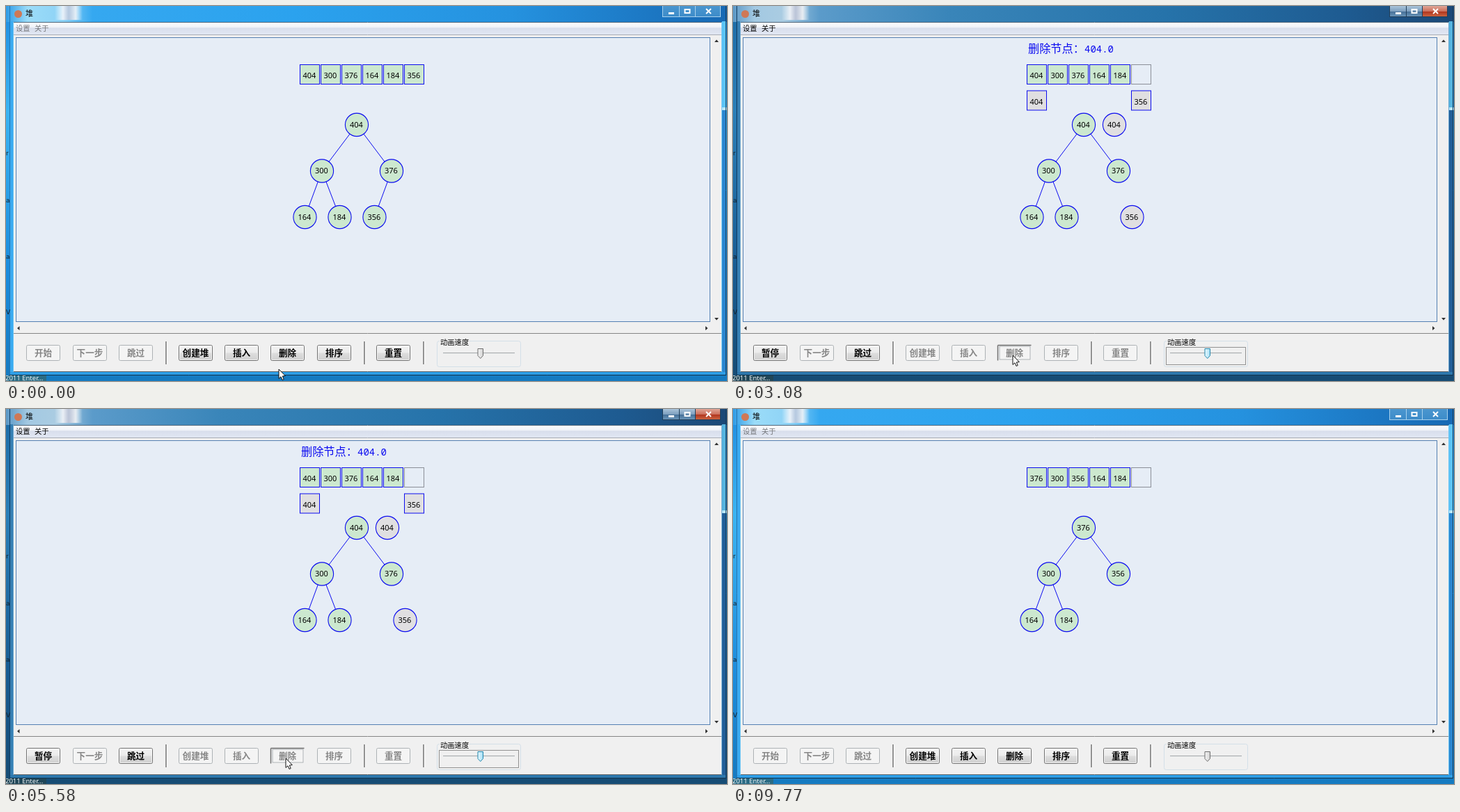
Recreate the animation shown at these times as an HTML page with a canvas. Size 1036x540 px, loop 9870 ms.

```html
<!DOCTYPE html>
<html lang="zh">
<head>
<meta charset="utf-8">
<title>堆</title>
<style>
html, body { margin: 0; width: 100%; height: 100%; overflow: hidden; }
canvas { display: block; }
</style>
</head>
<body>
<canvas id="stage" width="1036" height="540"></canvas>
<script>
const g = document.getElementById('stage').getContext('2d');
const LOOP = 9870, W = 1036, H = 540;
const CJK = '"Noto Sans CJK SC", "Noto Sans CJK", sans-serif';
const NUM = '11px "Noto Sans", sans-serif';
const NUM_BOLD = 'bold 10px "DejaVu Sans", sans-serif';
const BLUE = '#0c0cf0', GREEN = '#cce8cf', GREY = '#e0dfe1', RED = '#f00a0a';

const NODES = [[504, 171], [454, 237.5], [554, 237.5], [429.5, 304], [479.5, 304], [529.5, 304]];
const cellX = i => 422.5 + 30 * i;
const CELL_Y = 84.5, DROP = 37.5, SHIFT = 44;

// Screen updates come in runs of eight ticks.
const RUNS = [1140, 2240, 3350, 4400, 5580, 6660, 7740, 8790, 9840];
function tickAt(t) {
  if (t < RUNS[0]) return -1;
  let r = 0;
  while (r < 7 && t >= RUNS[r + 1]) r++;
  return r * 8 + Math.floor((t - RUNS[r]) / ((RUNS[r + 1] - RUNS[r]) / 8));
}

const clamp = v => Math.max(0, Math.min(1, v));
const mix = (a, b, p) => a + (b - a) * p;

function rect(x, y, w, h, fill) {
  g.fillStyle = fill;
  g.fillRect(x, y, w, h);
}
function box(x, y, w, h, fill, stroke, lw = 1) {
  if (fill) rect(x, y, w, h, fill);
  g.strokeStyle = stroke;
  g.lineWidth = lw;
  g.strokeRect(x, y, w, h);
}
function roundBox(x, y, w, h, r, fill, stroke) {
  g.beginPath();
  g.roundRect(x, y, w, h, r);
  if (fill) { g.fillStyle = fill; g.fill(); }
  g.strokeStyle = stroke;
  g.lineWidth = 1;
  g.stroke();
}
function line(x1, y1, x2, y2, color, lw = 1) {
  g.strokeStyle = color;
  g.lineWidth = lw;
  g.beginPath();
  g.moveTo(x1, y1);
  g.lineTo(x2, y2);
  g.stroke();
}
function poly(points, fill, stroke) {
  g.beginPath();
  points.forEach(([x, y]) => g.lineTo(x, y));
  g.closePath();
  g.fillStyle = fill;
  g.fill();
  if (stroke) { g.strokeStyle = stroke; g.lineWidth = 1; g.stroke(); }
}
function text(s, x, y, font, color, align = 'left') {
  g.font = font;
  g.fillStyle = color;
  g.textAlign = align;
  g.fillText(s, x, y);
}
function ramp(x1, y1, x2, y2, ...stops) {
  const grad = g.createLinearGradient(x1, y1, x2, y2);
  stops.forEach(([at, color]) => grad.addColorStop(at, color));
  return grad;
}

function drawDesktop(active) {
  rect(0, 0, W, H, active
    ? ramp(0, 0, 0, H, [0, '#1c6ba6'], [0.28, '#2a7fb8'], [0.7, '#175c93'], [1, '#164c74'])
    : ramp(0, 0, 0, H, [0, '#1f8ce0'], [0.28, '#3bb4f2'], [0.7, '#1c8ddd'], [1, '#157ac0']));
  rect(0, 0, W, 23, active
    ? ramp(0, 0, W, 0, [0, '#5a97c5'], [0.03, '#a3c9e2'], [0.07, '#aacce2'], [0.12, '#5b9bca'],
        [0.3, '#3985b9'], [0.6, '#2673aa'], [0.85, '#1e5b91'], [1, '#1b4876'])
    : ramp(0, 0, W, 0, [0, '#2e9be6'], [0.03, '#9bdcf8'], [0.08, '#8dd2f6'], [0.12, '#35a8f0'],
        [0.4, '#2ba2ee'], [0.7, '#2592df'], [1, '#1769b4']));
  rect(70, 0, 40, 20, ramp(70, 0, 110, 0, [0, 'rgba(255,255,255,0)'], [0.3, 'rgba(248,247,250,.85)'],
    [0.5, 'rgba(205,200,215,.7)'], [0.75, 'rgba(250,247,247,.85)'], [1, 'rgba(255,255,255,0)']));

  // window frame
  const edge = active ? '#6ba7d0' : '#6cc5f4';
  rect(6, 22, 4, 509, active ? '#367fb3' : '#3aaaf0');
  rect(1029, 22, 5, 128, active ? '#56b4df' : '#5cc4f6');
  rect(1029, 150, 5, 381, active ? '#225f98' : '#2b86cf');
  rect(1029, 146, 7, 4, '#b8e7fb');
  rect(6, 527, 1028, 4, active ? '#2d78ad' : '#2e9ee6');
  line(5.5, 0, 5.5, 531, active ? '#123c60' : '#2875ae');
  line(1034.5, 0, 1034.5, 531, '#143c5d');
  line(5, 531.5, 1035, 531.5, '#12354f');
  line(10.5, 23, 10.5, 527, edge);
  line(1028.5, 23, 1028.5, 527, edge);

  [['r', 215], ['a', 283], ['a', 364], ['V', 444]].forEach(([s, y]) =>
    text(s, 0, y, '9px "DejaVu Sans", sans-serif', '#10202c'));
  rect(0, 532, 58, 8, active ? '#204657' : '#2a6b84');
  text('2011 Enter...', -1, 539, '9.5px "Noto Sans", sans-serif', '#f2f6f8');
}

function drawTitle(active) {
  g.fillStyle = '#cf7856';
  g.beginPath();
  g.arc(17.5, 11.5, 5.5, 0, 7);
  g.fill();
  text('堆', 28, 15, '11px ' + CJK, '#000');

  const glass = active
    ? ramp(0, 0, 0, 16, [0, '#a9c3d9'], [0.48, '#7d9fbe'], [0.5, '#456f97'], [1, '#6f9abd'])
    : ramp(0, 0, 0, 16, [0, '#4a96cf'], [1, '#3c8bc8']);
  const red = active
    ? ramp(0, 0, 0, 16, [0, '#e0a596'], [0.48, '#cc6f5b'], [0.5, '#b0341d'], [1, '#cf6a45'])
    : glass;
  const rim = active ? '#203e59' : '#a6d0ec';
  box(943.5, -1.5, 24, 17, glass, rim);
  box(967.5, -1.5, 23, 17, glass, rim);
  box(990.5, -1.5, 36, 17, red, rim);
  rect(952, 9, 8, 3, '#fff');
  box(975.5, 5, 7, 5, null, '#fff', 2);
  line(1006, 4, 1013, 11, '#fff', 2);
  line(1013, 4, 1006, 11, '#fff', 2);
}

function drawClient(active) {
  rect(11, 23, 1017, 504, '#f0f0f0');
  rect(11, 24, 1017, 17, ramp(0, 24, 0, 41, [0, '#fff'], [0.42, '#edf0f7'], [0.45, '#d8deec'], [1, '#e1e7f3']));
  line(11, 23.5, 1028, 23.5, '#50667a');
  line(11, 41.5, 1028, 41.5, '#a9adb6');
  const ink = active ? '#000' : '#75777c';
  text('设置', 14, 36, '10.3px ' + CJK, ink);
  text('关于', 41, 36, '10.3px ' + CJK, ink);

  box(14.5, 45.5, 997, 409, '#e6edf6', '#5580b2');
  const tip = '#303030';
  poly([[1018, 52], [1024, 52], [1021, 48.5]], tip);
  poly([[1018, 449], [1024, 449], [1021, 452.5]], tip);
  poly([[19.5, 461], [19.5, 467], [16, 464]], tip);
  poly([[1005, 461], [1005, 467], [1008.5, 464]], tip);
  line(11, 471.5, 1028, 471.5, '#858585');
  line(11, 526.5, 1028, 526.5, '#666');
  [230, 515, 600].forEach(x => {
    line(x, 483, x, 516, '#7c7c7c', 1.6);
    line(x + 1.5, 483, x + 1.5, 516, '#fff');
  });
}

function button(label, x, inkOn, faceOn, mode) {
  const y = 488.5, w = 48, h = 22;
  if (mode === 'pressed') {
    rect(x, y, w, h, '#f4f4f4');
    box(x + 2.5, y + 1.5, w - 4, h - 3, null, '#adb2b5');
    line(x, y, x + w, y, '#707070', 1.5);
    line(x, y, x, y + h, '#707070', 1.5);
  } else {
    const face = mode === 'hover'
      ? ramp(0, y, 0, y + h, [0, '#eaf6fd'], [0.48, '#d9f0fc'], [0.52, '#bee6fd'], [1, '#a7d9f5'])
      : faceOn
        ? ramp(0, y, 0, y + h, [0, '#f3f3f3'], [0.48, '#ebebeb'], [0.52, '#dddddd'], [1, '#cfcfcf'])
        : '#f4f4f4';
    roundBox(x, y, w, h, 2, face, mode === 'hover' ? '#3c7fb1' : faceOn ? '#707070' : '#adb2b5');
    if (faceOn) roundBox(x + 1, y + 1, w - 2, h - 2, 1, null, 'rgba(255,255,255,.75)');
  }
  text(label, x + w / 2, 503.5, 'bold 12.6px ' + CJK, inkOn ? '#000' : '#868686', 'center');
}

function drawToolbar(t, n, active) {
  const busy = n >= 0 && n < 57;
  const faceBusy = n > 0 && n < 58;
  const mode = busy ? (t < 7740 ? 'pressed' : '') : t >= 300 && t < 1140 ? 'hover' : '';
  button(busy ? '暂停' : '开始', 29.5, busy, faceBusy);
  button('下一步', 96.5, false, false);
  button('跳过', 162.5, busy, faceBusy);
  button('创建堆', 248.5, !busy, !faceBusy);
  button('插入', 314.5, !busy, !faceBusy);
  button('删除', 380.5, !busy, !faceBusy, mode);
  button('排序', 447.5, !busy, !faceBusy);
  button('重置', 532.5, !busy, !faceBusy);

  roundBox(619.5, 482.5, 120, 37, 3, null, '#d3dfe8');
  rect(623, 480, 43, 9, '#f0f0f0');
  text('动画速度', 624, 487.5, '10.3px ' + CJK, '#000');
  line(628, 499.5, 731, 499.5, '#a9acae');
  line(628, 500.5, 731, 500.5, '#e4e7e8');
  if (active) {
    g.setLineDash([1, 1]);
    box(622.5, 491.5, 114, 25, null, '#333');
    g.setLineDash([]);
  }
  poly([[678, 493.5], [685.5, 493.5], [685.5, 503.5], [681.75, 507.5], [678, 503.5]],
    active ? ramp(678, 0, 686, 0, [0, '#eafaff'], [1, '#9fdcf4']) : ramp(678, 0, 686, 0, [0, '#f5f5f5'], [1, '#cfcfcf']),
    active ? '#2387ad' : '#6f6f6f');
}

function cell(x, y, value, fill) {
  box(x, y, 28, 28, fill, BLUE);
  text(value, x + 4, y + 19.5, NUM, '#000');
}
function node(x, y, value, fill) {
  g.beginPath();
  g.arc(x, y, 16.6, 0, 7);
  g.fillStyle = fill;
  g.fill();
  g.strokeStyle = BLUE;
  g.lineWidth = 1.1;
  g.stroke();
  text(value, x - 10, y + 3.7, NUM, '#000');
}
function mark(x, y, cx, cy) {
  box(x, y, 28.5, 28.5, null, RED, 2.6);
  g.beginPath();
  g.arc(cx, cy, 16.6, 0, 7);
  g.lineWidth = 2.8;
  g.stroke();
}
const markNode = i => mark(cellX(i), CELL_Y, ...NODES[i]);

// A red value travels in the array and in the tree at once.
function flyValue(value, p, fromCell, toCell, fromNode, toNode) {
  const at = (a, b, k) => mix(a[k], b[k], p);
  text(value, at(fromCell, toCell, 0) + 4, at(fromCell, toCell, 1) + 19.5, NUM_BOLD, RED);
  text(value, at(fromNode, toNode, 0) - 10, at(fromNode, toNode, 1) + 3.7, NUM_BOLD, RED);
}

function drawHeap(n) {
  const values = [n >= 45 ? 376 : 404, 300, n >= 56 ? 356 : 376, 164, 184, 356];
  const count = n >= 14 ? 5 : 6;
  for (let i = 1; i < count; i++) {
    line(...NODES[(i - 1) >> 1], ...NODES[i], BLUE);
  }
  if (count < 6) box(cellX(5), CELL_Y, 28, 28, null, '#8b8f98');
  for (let i = 0; i < count; i++) {
    cell(cellX(i), CELL_Y, values[i], GREEN);
    node(...NODES[i], values[i], GREEN);
  }
  if (n < 1 || n >= 57) return;

  text('删除节点：', 424, 67, '16.2px ' + CJK, BLUE);
  text('404.0', 505, 67, '14px "Noto Sans Mono", monospace', BLUE);

  const copy = (i, value, p) => {
    cell(cellX(i), CELL_Y + DROP * p, value, GREY);
    node(NODES[i][0] + SHIFT * p, NODES[i][1], value, GREY);
  };
  copy(0, 404, clamp(n / 7));
  if (n >= 8) copy(5, 356, clamp(0.09 + (n - 8) * 0.152));

  const spareCell = [cellX(5), CELL_Y + DROP];
  const spareNode = [NODES[5][0] + SHIFT, NODES[5][1]];
  if (n % 2 && n >= 15 && n <= 33) {
    if (n <= 23) markNode(1);
    else mark(...spareCell, ...spareNode);
    markNode(2);
  }
  const cellAt = i => [cellX(i), CELL_Y];
  if (n >= 35 && n < 45) {
    flyValue(376, clamp((n - 34.8) * 0.105), cellAt(2), cellAt(0), NODES[2], NODES[0]);
  }
  if (n >= 46 && n < 56) {
    flyValue(356, clamp(0.07 + (n - 46) * 0.105), spareCell, cellAt(2), spareNode, NODES[2]);
  }
}

function drawCursor(t) {
  const path = [[0, 392, 523], [150, 396, 517], [300, 400, 509], [450, 402, 503],
    [7605, 403, 505], [7740, 402, 514], [7870, 399, 528], [8002, 396, 560]];
  const [, x, y] = path.filter(p => t >= p[0]).pop();
  const shape = [[0, 0], [0, 13.5], [3, 10.8], [5, 15.5], [7.2, 14.5], [5.3, 10], [9.3, 9.6]];
  poly(shape.map(([dx, dy]) => [x + dx, y + dy]), '#fff', '#111');
}

function draw(t) {
  const n = tickAt(t), active = t >= 1140 && t < 9770;
  drawDesktop(active);
  drawTitle(active);
  drawClient(active);
  drawToolbar(t, n, active);
  drawHeap(n);
  drawCursor(t);
}

const begin = performance.now();
function loop() {
  draw((performance.now() - begin) % LOOP);
  requestAnimationFrame(loop);
}
loop();
</script>
</body>
</html>
```
